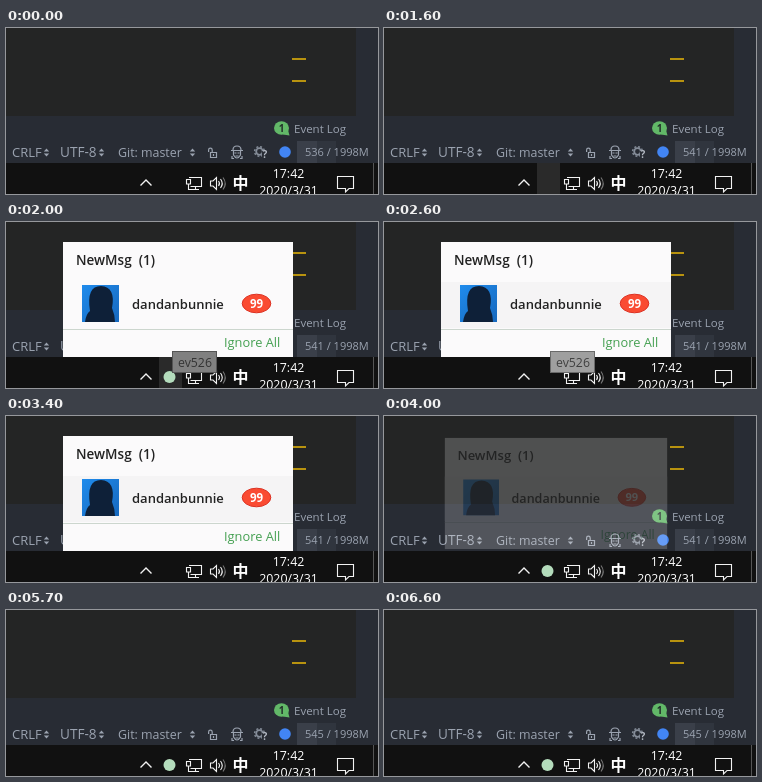
An HTML page for the animation above (6.7 s loop, 372 by 166 pixels).

```html
<!DOCTYPE html>
<html lang="en">
<head>
<meta charset="utf-8">
<style>
  html, body { margin: 0; width: 100%; height: 100%; overflow: hidden; background: #111; }
  svg { display: block; width: 372px; height: 166px; font-family: "Open Sans", sans-serif; }
  text { white-space: pre; }
  .status { fill: #9ba3b0; font-size: 13px; }
  .tray { fill: none; stroke: #f2f2f2; stroke-width: 1.1; }
  .clock { fill: #fff; font-size: 12.4px; text-anchor: middle; }
  .bold { fill: #222; font-weight: 600; }
  #popup { transform-origin: 172px 77.5px; }
</style>
</head>
<body>
<svg viewBox="0 0 372 166">
  <defs>
    <path id="sort" d="M-2.700 -1L0 -4L2.700 -1ZM-2.700 1L0 4L2.700 1Z" fill="#9ba3b0"/>
    <linearGradient id="blue" x2="1" y2="1">
      <stop stop-color="#1f8bec"/><stop offset="1" stop-color="#1768bd"/>
    </linearGradient>
  </defs>

  <!-- editor and status bar -->
  <rect width="372" height="136" fill="#282c34"/>
  <rect width="350" height="88" fill="#242525"/>
  <path d="M286 31H300M286 53H300" stroke="#b8930f" stroke-width="2"/>
  <path d="M277 106.500L282 102L283.500 107.500Z" fill="#62b868"/>
  <ellipse cx="275.500" cy="100" rx="7.500" ry="6.800" fill="#62b868"/>
  <text x="275.500" y="104" font-size="10" font-weight="700" text-anchor="middle" fill="#23302a">1</text>
  <text class="status" x="288" y="105" style="font-size:11.5px">Event Log</text>
  <g class="status">
    <text x="6" y="129">CRLF</text>
    <text x="54" y="129" style="font-size:13.6px">UTF-8</text>
    <text x="112" y="129" style="font-size:12.4px">Git: master</text>
  </g>
  <use href="#sort" x="40.500" y="124.500"/>
  <use href="#sort" x="95.500" y="124.500"/>
  <use href="#sort" x="186.500" y="124.500"/>
  <g fill="none" stroke="#9ba3b0" stroke-width="1.200">
    <path d="M202.600 124V122A1.800 1.800 0 0 1 206.200 122V124.500M204.500 124.500H210.500V129.500H204.500ZM207.500 126V128"/>
    <path d="M227 122Q227 118 231 118T235 122M225 122.500H237M227.500 123V127Q231 133 234.500 127V123M228.500 125H230.500M231.500 125H233.500M229.500 128H232.500M226 128V130.500H228M236 128V130.500H234"/>
    <g stroke="#858d99">
      <circle cx="253.500" cy="123.500" r="3.300" stroke-width="1.800"/>
      <circle cx="253.500" cy="123.500" r="4.900" stroke-width="1.500" stroke-dasharray="1.950 1.900"/>
    </g>
  </g>
  <rect x="256" y="123" width="6" height="9" fill="#282c34"/>
  <text x="256.500" y="130" font-size="10" font-weight="700" fill="#b4bac4">?</text>
  <circle cx="279" cy="124" r="5.800" fill="#4285f4"/>
  <rect x="291" y="113" width="39" height="22" fill="#30353e"/>
  <rect x="291" y="113" width="20" height="22" fill="#3a3f49"/>
  <text id="memory" class="status" x="299" y="127.700" style="font-size:11px"></text>

  <!-- taskbar -->
  <rect y="135" width="372" height="31" fill="#111"/>
  <rect id="hover" x="153" y="135" width="23" height="31" fill="#2a2a2a"/>
  <circle id="blink" cx="163.500" cy="155" r="6" fill="#b4dcbc"/>
  <g class="tray">
    <path d="M134.500 157.500L140 152L145.500 157.500" stroke-width="1.400"/>
    <path d="M183 149.500H195.500V158.500H184.500M189.500 158.500V161.500M186 161.500H193M180.500 151.500H184.500V156H180.500ZM182.500 156V161.500H186"/>
    <path d="M204.500 153H207L210.500 149.500V161.500L207 158H204.500ZM212.500 153Q214.500 155.500 212.500 158M214.500 151Q218 155.500 214.500 160"/>
    <path d="M217 149.500Q221.500 155.500 217 161.500" stroke="#777"/>
    <path d="M331.500 148.500H347.500V160.500H343L339.500 164V160.500H331.500Z"/>
    <path d="M367.500 135V166" stroke="#555" stroke-width="1"/>
  </g>
  <text x="226.500" y="161" font-size="16" font-weight="700" fill="#fff" font-family="Noto Sans CJK SC, Noto Sans CJK, sans-serif">中</text>
  <text class="clock" x="282.500" y="150">17:42</text>
  <text class="clock" x="282.500" y="167">2020/3/31</text>

  <!-- message popup -->
  <g id="popup">
    <rect x="57" y="20" width="230" height="115" fill="#fbfafb"/>
    <rect id="row" x="57" y="60" width="230" height="46" fill="#f5f4f5"/>
    <text class="bold" x="70" y="43" font-size="13.500">NewMsg  (1)</text>
    <rect x="76" y="63" width="37" height="37" fill="url(#blue)"/>
    <path d="M79 100Q80 92 84 89Q80 64 95 64Q110 65 106 86Q109 93 109 100Z" fill="#0e2038"/>
    <text class="bold" x="126" y="87" font-size="13">dandanbunnie</text>
    <ellipse cx="250.500" cy="81.500" rx="14.300" ry="9.300" fill="#fa4b32" stroke="#dc2f20"/>
    <text x="250.500" y="85.500" font-size="11.500" font-weight="700" text-anchor="middle" fill="#fff">99</text>
    <path d="M57 107.500H287" stroke="#ccd6ce"/>
    <text x="218" y="124.700" font-size="12.800" fill="#45a052">Ignore All</text>
  </g>
  <g id="tip">
    <rect x="166.500" y="129.500" width="44" height="21" fill="#fff" stroke="#aaa"/>
    <text x="172" y="144.500" font-size="12.300" fill="#666">ev526</text>
  </g>
</svg>
<script>
  const LOOP = 6700, STEP = 100, BLINK = 3200 / 7;
  const el = id => document.getElementById(id);
  const [memory, hover, blink, popup, row, tip] =
    ['memory', 'hover', 'blink', 'popup', 'row', 'tip'].map(el);
  const clamp = v => Math.max(0, Math.min(1, v));
  const show = (node, on) => node.style.visibility = on ? 'inherit' : 'hidden';

  function draw(now) {
    const t = Math.floor(now % LOOP / STEP) * STEP;

    const used = t < 1000 ? 536 : t < 5500 ? 541 : 545;
    memory.textContent = `${used} / 1998M`;

    show(blink, Math.floor((t - 150) / BLINK) % 2 === 0);
    show(hover, t >= 1500 && t < 2500);
    show(row, t >= 2500);

    // The popup fades and grows in, then shrinks away.
    const alpha = Math.min(clamp((t - 1600) / 235), clamp((4050 - t) / 250));
    popup.style.opacity = alpha;
    popup.style.transform = `scale(${0.958 + 0.042 * alpha})`;

    const light = Math.min(clamp((t - 1900) / 200), clamp((2700 - t) / 160));
    show(tip, light > 0);
    tip.style.filter = `brightness(${light})`;
  }

  const start = performance.now();
  (function tick() {
    draw(performance.now() - start);
    requestAnimationFrame(tick);
  })();
</script>
</body>
</html>
```
